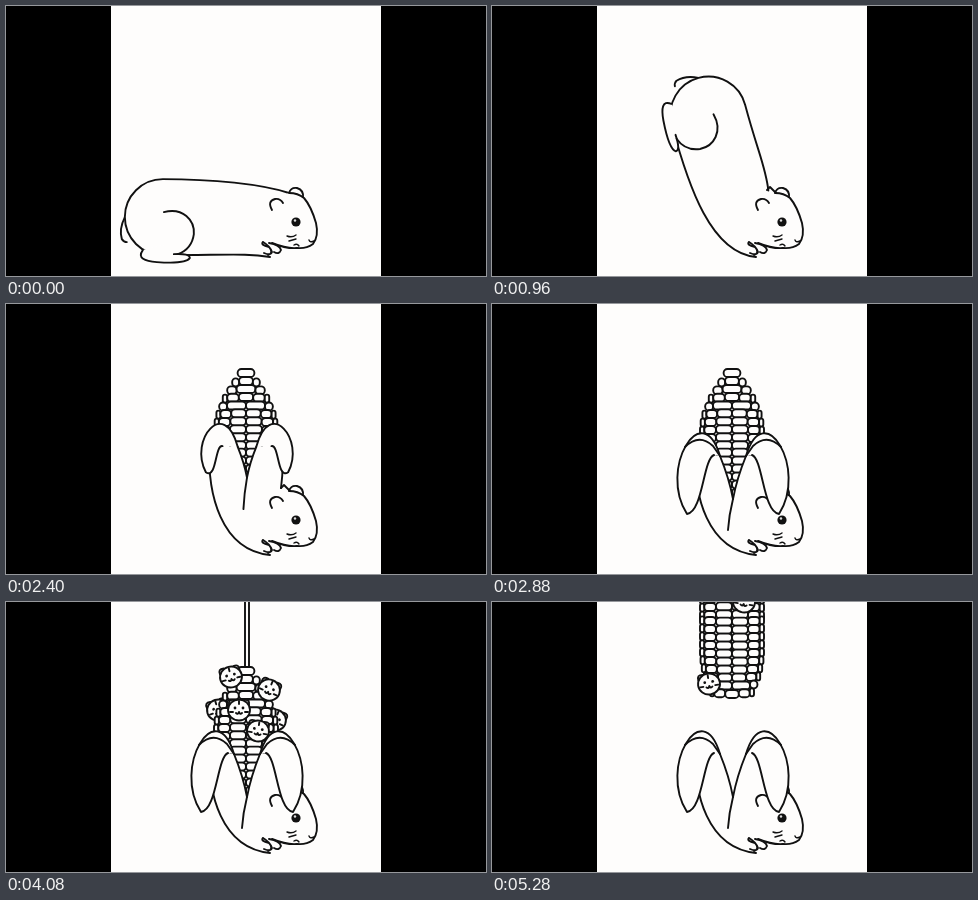
Write an HTML page with a canvas that moves like this. It is 480x270 px and loops after 5400 ms.

```html
<!DOCTYPE html>
<html lang="en">
<head>
<meta charset="utf-8">
<title>Hamster corn</title>
<style>
html, body { margin: 0; width: 100%; height: 100%; overflow: hidden; background: #000; }
canvas { display: block; }
</style>
</head>
<body>
<canvas id="stage" width="480" height="270"></canvas>
<script>
const ctx = document.getElementById('stage').getContext('2d');
const LOOP = 5400, STEP = 120, INK = '#111', PAPER = '#fefdfc';
const MID = 241, RUMP = 38, LINE = 1.9, LIFT = 129, RAD = Math.PI / 180;

const clamp = v => Math.max(0, Math.min(1, v));
const span = (t, a, b) => clamp((t - a) / (b - a));
const lerp = (a, b, p) => a + (b - a) * p;

function ink(d) { ctx.stroke(new Path2D(d)); }

// The extra part is filled but not outlined
function paint(d, extra = '') {
  ctx.fill(new Path2D(d + extra));
  ink(d);
}

function place(x, y, turn, sx, sy, draw) {
  ctx.save();
  ctx.translate(x, y);
  ctx.rotate(turn);
  ctx.scale(sx, sy);
  draw();
  ctx.restore();
}

function dot(x, y, r, color = INK) {
  ctx.fillStyle = color;
  ctx.beginPath();
  ctx.arc(x, y, r, 0, 7);
  ctx.fill();
  ctx.fillStyle = PAPER;
}

function drawHead(raised) {
  paint('M283 187Q285 181 291 182Q298 184 297 192');
  paint('M283 187Q292 187 298 192Q305 200 310 217Q313 230 307 238Q300 243 291 242Q281 243 266 237', 'L272 192Z');
  if (raised) ink('M275 184L278 181L284 187');
  ink('M266 204Q261 195 269 193Q274 192 277 197');
  paint('M257 236Q254 239 263 241Q268 247 262 249M257 236Q264 240 266 246Q265 250 258 247');
  paint('M263 237Q274 239 275 244Q273 249 268 246');
  ctx.lineWidth = 1.4;
  ink('M281 230Q286 232 290 229M283 235L290 233M288 239Q291 237 293 240M303 234Q304 237 308 235');
  ctx.lineWidth = LINE;
  dot(290, 216, 4.6);
  dot(289, 214.5, 1.2, '#ddd');
}

// Centre of the rump while the body swings up around the head
function rumpAt(p) {
  const a = (187 + 70 * p) * RAD, d = 114 + 17 * p;
  return [270 + d * Math.cos(a), 225 + d * Math.sin(a)];
}

function onRump(p, draw) {
  place(...rumpAt(p), 90 * p * RAD, 1, 1, draw);
}
const drawTail = () => ink('M-38 0Q-44 12 -41 22Q-39 25 -36 25');
const drawLeg = () => {
  paint('M-20 33C-26 41 -18 44 -6 45C8 46 24 46 27 41Q27 36 11 37', 'L0 28Z');
  ink('M1 -5C20 -10 32 3 31 17Q29 32 15 37');
};

function drawRoll(t) {
  const p = Math.min(1, (t / 1005) ** 4), turn = 90 * p * RAD;
  const [x, y] = rumpAt(p), c = Math.cos(turn), s = Math.sin(turn);
  const local = (u, v) => [x + u * c - v * s, y + u * s + v * c];
  const neck = [lerp(283, 275, p), lerp(187, 184, p)];
  onRump(p, drawTail);
  ctx.beginPath();
  ctx.moveTo(...neck);
  ctx.bezierCurveTo(neck[0] + lerp(-28, 3, p), neck[1] + lerp(-9, -25, p),
    ...local(50, -RUMP), ...local(0, -RUMP));
  ctx.arc(x, y, RUMP, turn - Math.PI / 2, turn + Math.PI / 2, true);
  ctx.bezierCurveTo(...local(65, RUMP), lerp(240, 215, p), 247, 264, 251);
  ctx.fill();
  ctx.stroke();
  onRump(p, drawLeg);
  drawHead(t >= 600);
}

// x, y, tilt, in the order they pop out
const pups = [
  [212, 108, -.3], [269, 118, .4], [225, 75, -.25],
  [263, 88, .4], [252, 129, .15], [233, 108, 0], [217, 211, -.15]
];

function drawPup([x, y, tilt], i, t) {
  const start = 3000 + 72 * i, p = span(t, start, start + 180);
  if (!p) return;
  const size = p ** .4;
  place(x, y, tilt, size, size, () => {
    if (p === 1) paint('M-10 -5Q-11 -11 -5 -10M5 -10Q11 -11 10 -5');
    ctx.beginPath();
    ctx.ellipse(0, 0, lerp(8, 11, p), 10.5, 0, 0, 7);
    ctx.fill();
    ctx.stroke();
    for (const side of [-1, 1]) dot(4 * side, -2, 1.4);
    if (p === 1) ink('M-3 3Q-1 5 0 2Q1 5 3 3M-9 2H-6M6 2H9M0 -9V-6');
  });
}

function cobWidth(y, full) {
  const top = 2 + 30 * Math.sin(clamp((y - 61) / 66) * Math.PI / 2);
  return Math.max(top, 22 * full) - 12 * clamp((y - 180) / 46) ** 2;
}

function drawCob(t) {
  const full = 1 - span(t, 1800, 2400);
  for (let k = 0; k < 20; k++) {
    const y = 65 + 8 * k, w = cobWidth(y + 5, full);
    const n = w > 27 ? 6 : Math.max(1, Math.round(w / 6) + k % 2);
    const edge = i => 240 + w * Math.sin((i / n - .5) * Math.PI);
    for (let i = 0; i < n; i++) {
      const x = edge(i), wide = edge(i + 1) - x;
      const sag = 2 * Math.abs((i + .5) / n * 2 - 1) * (k > 9 ? -1 : 1);
      ctx.beginPath();
      ctx.roundRect(x, y + sag, wide, 8, Math.min(3.8, wide / 2));
      ctx.fill();
      ctx.stroke();
    }
  }
}

function drawCorn(t) {
  const stick = lerp(-150, 27, span(t, 3720, 4440));
  const show = behind => pups.forEach((p, i) => {
    if (behind === Math.abs(p[0] - 240) > 27) drawPup(p, i, t);
  });
  ctx.save();
  ctx.beginPath();
  ctx.rect(0, 0, 480, 195);
  ctx.clip();
  ctx.translate(0, -LIFT * span(t, 4680, 5280));
  if (t > 3720) {
    ctx.fillRect(239, stick, 4, 150);
    ctx.strokeRect(239, stick, 4, 150);
  }
  show(true);
  drawCob(t);
  show(false);
  ctx.restore();
}

// Right half of the husk from its middle: outer base, tip and inner base with handles
const CLOSED = [38, 120, 38, 85, 24, 60, 0, 60, 0, 80, 0, 100, 0, 120];
const OPEN = [38, 120, 38, 103, 30, 95, 29, 64, 17, 62, 1, 95, 0, 120];
const HANGING = [19, 151, 30, 155, 30, 208, 46, 210, 75, 165, 31, 92, 13, 152];

function drawPeel(side, open, hang) {
  const q = CLOSED.map((v, i) => lerp(lerp(v, OPEN[i], open), HANGING[i], hang));
  place(MID, 0, 0, side, 1, () => {
    ctx.beginPath();
    ctx.moveTo(q[0], q[1]);
    ctx.bezierCurveTo(...q.slice(2, 8));
    ctx.bezierCurveTo(...q.slice(8));
    ctx.fill();
    ctx.stroke();
    if (hang > .85) ink('M48 143Q34 129 20 142L13 152');
  });
}

function drawHusk(t) {
  const open = span(t, 1200, 1800), hang = span(t, 1800, 2640);
  const dip = 120 + 75 * hang, rim = 120 + 32 * hang;
  const top = 120 + 30 * hang, in1 = 13 * hang, in2 = 4 * hang;
  const left = `M264 251C215 246 201 190 ${200 + 5 * hang} ${top}`;
  const notch = `${MID - in1} ${rim}Q${MID - in2} ${rim + 22 * hang} ${MID} ${dip}` +
    `Q${MID + in2} ${rim + 22 * hang} ${MID + in1} ${rim}`;
  const right = `${279 - 4 * hang} ${top}Q278 160 275 184`;
  ctx.fill(new Path2D(`${left}L${notch}L${right}Z`));
  ink(left);
  ink('M' + right);
  if (hang) ink('M' + notch);
  ink(`M${MID} ${dip}Q${MID - 4 * hang} ${dip + 16} ${MID - 5 * hang} ${120 + 33 * open + 73 * hang}`);
  drawHead(true);
  const leg = hang < .3;
  if (leg) onRump(1, drawTail);
  drawPeel(-1, open, hang);
  if (leg) onRump(1, drawLeg);
  drawPeel(1, open, hang);
}

function draw(t) {
  ctx.fillStyle = '#000';
  ctx.fillRect(0, 0, 480, 270);
  ctx.save();
  ctx.beginPath();
  ctx.rect(105, 0, 270, 270);
  ctx.clip();
  ctx.fillStyle = PAPER;
  ctx.fillRect(105, 0, 270, 270);
  ctx.strokeStyle = INK;
  ctx.lineWidth = LINE;
  ctx.lineCap = ctx.lineJoin = 'round';
  if (t <= 1200) {
    drawRoll(t);
  } else {
    drawCorn(t);
    drawHusk(t);
  }
  ctx.restore();
}

function tick() {
  const t = performance.now() % LOOP;
  draw(Math.floor(t / STEP) * STEP);
  requestAnimationFrame(tick);
}
tick();
</script>
</body>
</html>
```
